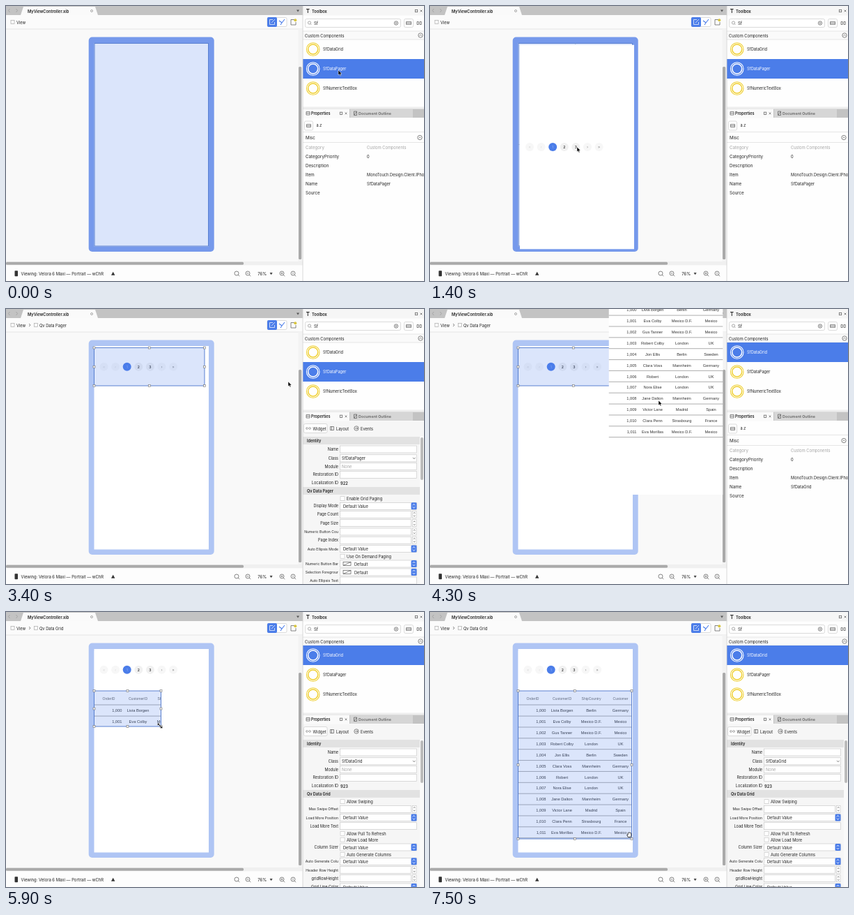
Recreate the animation shown at these times as an HTML page. Size 600 px wide and 394 px high, loop 9.03 s.

```html
<!DOCTYPE html>
<html lang="en">
<head>
<meta charset="utf-8">
<title>Designer drag and drop</title>
<style>
  html, body { margin: 0; width: 100%; height: 100%; overflow: hidden; background: #fff; }
  #stage { display: block; width: 100vw; height: 100vh; }
  text { font: 5.7px Inter, Roboto, sans-serif; fill: #222; dominant-baseline: central; white-space: pre; }
  .bold { font-weight: 600; }
  .dim { fill: #a5a5a5; }
  .end { text-anchor: end; }
  .mid { text-anchor: middle; }
  .prop { font-size: 6.2px; }
  .icon { fill: none; stroke: #555; stroke-width: .7; }
  .rule { stroke: #dcdcdc; stroke-width: .7; }
  .field { fill: #fff; stroke: #c4c4c4; stroke-width: .6; }
  .blue { fill: #4b7de9; }
  .ring { fill: none; stroke: #f0d032; }
  .item.on text { fill: #fff; }
  .item.on .ring { stroke: #fff; }
  .item .bar { fill: none; }
  .item.on .bar { fill: #4b7de9; }
  .cell { font: 5.7px "Liberation Sans", Arial, sans-serif; fill: #333; }
  .head { font-size: 5.1px; fill: #666; }
  .tint { fill: #4b7de9; fill-opacity: .2; stroke: #4b74cc; stroke-width: .9; }
  .handle { fill: #f4f4f4; stroke: #777; stroke-width: .6; transform: translate(-1.5px, -1.5px); }
  .guide { stroke: #8095c4; stroke-width: .6; stroke-dasharray: 2 1.5; }
  .sel { overflow: visible; }
</style>
</head>
<body>
<svg id="stage" viewBox="0 0 600 394" preserveAspectRatio="none">
  <defs>
    <g id="lens" class="icon"><circle r="3"/><path d="M2.2 2.2L4.2 4.2"/></g>
    <g id="fold" class="icon"><circle r="3.2"/><path d="M-1.5 .7L0 -.8L1.5 .7"/></g>
    <g id="pin" class="icon" stroke-width=".5"><rect x="-1.7" y="-1.7" width="3.4" height="3.4"/></g>
    <path id="cross" class="icon" d="M-1.3 -1.3L1.3 1.3M1.3 -1.3L-1.3 1.3"/>
  </defs>

  <!-- editor -->
  <rect width="426" height="394" fill="#f9f9f9"/>
  <rect width="426" height="13" fill="#c3c3c3"/>
  <path d="M21 13L25 1H128L132 13Z" fill="#fafafa"/>
  <path class="icon" d="M5.5 4L3.5 6.5L5.5 9M14.5 4L16.5 6.5L14.5 9" style="stroke:#999"/>
  <text class="bold" x="31" y="7">MyViewController.xib</text>
  <circle class="icon" cx="123" cy="7" r="1.5" style="stroke:#888"/>
  <path d="M417 5.5H421L419 8.5Z" fill="#555"/>
  <rect y="13" width="426" height="20" fill="#fbfbfb"/>
  <path class="rule" d="M0 33H426"/>
  <rect class="icon" x="7" y="20.5" width="5" height="5" style="stroke:#aaa"/>
  <text x="15" y="23">View</text>
  <g id="crumb">
    <path class="icon" d="M33 21L35 23L33 25"/>
    <rect class="icon" x="40.5" y="20.5" width="5" height="5" style="stroke:#aaa"/>
    <text id="crumbText" x="48" y="23"></text>
  </g>
  <rect class="field" x="375" y="16.5" width="28" height="13" rx="2"/>
  <rect class="blue" x="375" y="16" width="14" height="14" rx="2"/>
  <path class="icon" d="M383 19.5H378.5V26.5H385.5V23M381 24.2L386 19" style="stroke:#fff"/>
  <path d="M392 21L396 24L400 19M396 24L394 27" class="icon" style="stroke:#4b7de9;stroke-width:1.1"/>
  <path class="icon" d="M414 19.5H409V27H416V23"/>
  <circle cx="415.3" cy="20.3" r="2" fill="#d9c640"/>

  <!-- device -->
  <rect id="device" x="118.7" y="44.5" width="180" height="307.5" rx="5"/>
  <rect x="126.5" y="53" width="164.5" height="291.5" fill="#fff"/>
  <rect id="viewTint" class="tint" x="127" y="53.5" width="163.5" height="290.5"/>
  <svg id="pagerView" class="view"></svg>
  <svg id="gridView" class="view"></svg>
  <svg id="pagerSel" class="sel"></svg>
  <svg id="gridSel" class="sel"></svg>
  <path id="guides" class="guide" d="M208.7 53V345M126.5 198.5H291"/>

  <!-- scrollbars and status -->
  <rect x="419.5" y="33" width="6" height="333" fill="#f3f3f3"/>
  <rect x="420" y="87" width="4.2" height="276" rx="1.5" fill="#aaa"/>
  <rect y="366" width="426" height="5.5" fill="#f0f0f0"/>
  <rect y="366.8" width="341" height="4" rx="1.5" fill="#aaa"/>
  <rect y="371.5" width="426" height="22.5" fill="#fdfdfd"/>
  <rect x="12.5" y="379.3" width="4.5" height="8" rx=".8" fill="#333"/>
  <text x="21.5" y="383.3" style="font-size:5.9px">Viewing: Velora 6 Maxi — Portrait — wChR</text>
  <path d="M151 385.8H156.4L153.7 380.8Z" fill="#333"/>
  <use href="#lens" x="331" y="383"/>
  <use href="#lens" x="347" y="383"/><path class="icon" d="M345.6 383H348.4"/>
  <text x="361.3" y="383.3" style="font-size:6px">76%</text>
  <path d="M378.6 382H382.6L380.6 385.2Z" fill="#444"/>
  <use href="#lens" x="396" y="383"/><path class="icon" d="M394.6 383H397.4M396 381.6V384.4"/>
  <use href="#lens" x="412" y="383"/><path class="icon" d="M412 381.6V384.4"/>

  <!-- toolbox -->
  <rect x="426" width="174" height="394" fill="#fefefe"/>
  <rect x="426" width="174" height="13.5" fill="#f6f6f6"/>
  <path class="icon" d="M431 4.5H435.6M433.3 4.5V10" style="stroke:#222;stroke-width:1"/>
  <text class="bold" x="439" y="7">Toolbox</text>
  <use href="#pin" x="589" y="7"/><use href="#cross" x="596" y="7"/>
  <rect class="field" x="429.5" y="18.5" width="137" height="12" rx="2"/>
  <use href="#lens" transform="translate(435.5 24) scale(.7)"/>
  <text x="442" y="24.5" style="font-size:6px">Sf</text>
  <circle class="icon" cx="560" cy="24.5" r="2.7"/><use href="#cross" x="560" y="24.5"/>
  <rect class="field" x="571.5" y="18.5" width="13" height="12" rx="2"/>
  <path class="icon" d="M574.5 22.5H581.5V26.5H574.5ZM574.5 24.5H581.5M590 22.5H592.2V26.5H590ZM594 22.5H596.2V26.5H594Z"/>
  <rect x="426" y="36" width="174" height="12" fill="#fafafa"/>
  <path class="rule" d="M426 36H600M426 48H600"/>
  <text x="429" y="42">Custom Components</text>
  <use href="#fold" x="595" y="42"/>
  <g id="items"></g>

  <!-- properties -->
  <rect x="426" y="144.5" width="174" height="3" fill="#eee"/>
  <rect x="426" y="147.5" width="174" height="12.5" fill="#c3c3c3"/>
  <rect x="426" y="147.5" width="67" height="13" fill="#fafafa"/>
  <rect x="494" y="148" width="90" height="12" fill="#d6d6d6"/>
  <path class="icon" d="M431 151.5H436V156H431ZM431 153.7H436M499.5 151H503.5V156.5H499.5ZM500 156L503 151.5"/>
  <text class="bold" x="438" y="153.8" style="font-size:5.5px">Properties</text>
  <use href="#pin" x="481" y="153.8"/><use href="#cross" x="488" y="153.8"/>
  <text class="bold" x="506" y="153.8" style="font-size:5.4px;fill:#666">Document Outline</text>
  <g id="itemPanel">
    <rect class="field" x="428.5" y="165" width="12" height="13" rx="2"/>
    <path class="icon" d="M431.5 169.5H437.5V173.5H431.5ZM431.5 171.5H437.5"/>
    <text x="445.5" y="171" style="font-size:5.5px">a.z</text>
    <path class="rule" d="M426 180.5H600M426 195.5H600"/>
    <text class="prop" x="430" y="188.5">Misc</text>
    <use href="#fold" x="594" y="188.5"/>
    <g id="itemProps"></g>
  </g>
  <g id="pagerPanel"></g>
  <g id="gridPanel"></g>
  <path d="M426 0V394" stroke="#d0d0d0" stroke-width=".8"/>

  <svg id="pagerGhost"></svg>
  <svg id="gridGhost"></svg>

  <g id="cursor" stroke-linejoin="round">
    <path id="arrow" d="M0 0V7L1.6 5.6L2.7 8L3.9 7.5L2.9 5.1H5Z" stroke="#fff" stroke-width=".5"/>
    <path id="resize" d="M-3.5 -3.5H-.3L-1.4 -2.2L2.2 1.4L3.5 .3V3.5H.3L1.4 2.2L-2.2 -1.4L-3.5 -.3Z" stroke="#fff" stroke-width=".4"/>
    <path id="hand" d="M-1.8 3.5L-3.3 .2Q-3 -.8 -1.9 .4V-2.4Q-1.3 -3.3 -.8 -2.4Q-.2 -4 .4 -2.8Q1.1 -3.7 1.6 -2.3Q2.6 -2.8 2.8 -1.6V1.4L2 3.5Z" fill="#fff" stroke="#111" stroke-width=".8"/>
  </g>
</svg>

<script>
const LOOP = 9030, STEP = 100, LAST = 7500;
const $ = id => document.getElementById(id);
const text = (x, y, s, cls = '', size = '') =>
  `<text x="${x}" y="${y}" class="${cls}"${size && ` style="font-size:${size}px"`}>${s}</text>`;
const rect = (x, y, w, h, cls) => `<rect x="${x}" y="${y}" width="${w}" height="${h}" class="${cls}"/>`;

// ---- toolbox and item properties
const TITLES = { pager: 'Qv Data Pager', grid: 'Qv Data Grid' };
$('items').innerHTML = ['SfDataGrid', 'SfDataPager', 'SfNumericTextBox'].map((name, i) => {
  const y = 62 + 28 * i;
  return `<g class="item">${rect(426, y - 14, 174, 28, 'bar')}
    <circle class="ring" cx="440.7" cy="${y}" r="9.3" stroke-width="1.1"/>
    <circle class="ring" cx="440.7" cy="${y}" r="7" stroke-width="1.5"/>
    ${text(455, y + .3, name, '', 5.6)}</g>`;
}).join('');
const items = [...$('items').children];

$('itemProps').innerHTML = [
  ['Category', 'Custom Components'], ['CategoryPriority', '0'], ['Description', ''],
  ['Item', 'MonoTouch.Design.Client.IPhone'], ['Name', ''], ['Source', '']
].map(([label, value], i) => {
  const y = 202.5 + 13 * i, dim = i ? '' : ' dim';
  return text(430, y, label, 'prop' + dim) + text(518, y, value, dim);
}).join('') + '<text id="itemName" x="518" y="254.5"></text>';

// ---- widget property panels
const label = (y, s) => text(477, y, s, 'end', s.length > 15 ? 5.1 : 5.5);
const field = (y, w = 110) => rect(479.5, y - 5, w, 10, 'field');
const section = (y, s) => rect(426, y - 5.5, 168, 11, 'section') + text(432, y, s, 'bold', 5.5);
const picker = y => `<rect class="blue" x="581.5" y="${y - 5}" width="8" height="10" rx="1.5"/>
  <path d="M583.8 ${y - 1}l1.7 -2l1.7 2M583.8 ${y + 1}l1.7 2l1.7 -2" fill="none" stroke="#fff" stroke-width=".8"/>`;
const rows = {
  check: (y, s) => rect(480, y - 3, 6, 6, 'field') + text(489, y, s),
  text: (y, s) => label(y, s) + field(y),
  select: (y, s) => label(y, s) + field(y) + text(484, y, 'Default Value') + picker(y),
  color: (y, s) => label(y, s) + field(y) + rect(484, y - 2.5, 11, 5, 'icon') +
    `<path class="icon" d="M484 ${y + 2.5}l11 -5"/>` + text(500, y, 'Default') + picker(y),
  step: (y, s) => label(y, s) + field(y, 102) + rect(583.5, y - 5, 5.5, 10, 'field') +
    `<path class="icon" d="M585 ${y - 1.5}l1.2 -1.4l1.2 1.4M585 ${y + 1.5}l1.2 1.4l1.2 -1.4"/>`
};

function panel(title, cls, id, list) {
  return `<rect x="426" y="160.5" width="174" height="234" fill="#f6f6f6"/>
    <rect class="field" x="427.5" y="164.5" width="33.5" height="13" rx="2"/>
    <path class="icon" d="M432.5 169L430.5 171L432.5 173M435.5 169L437.5 171L435.5 173M432.5 171H435.5
      M465.5 168.5H470.5V173.5H465.5ZM467.5 168.5V173.5M501 171H505M503.5 169.5L505 171L503.5 172.5"/>
    <circle class="icon" cx="503" cy="171" r="3.2"/>
    ${text(440.5, 171, 'Widget')}${text(474, 171, 'Layout')}${text(509, 171, 'Events')}
    ${section(188.5, 'Identity')}
    ${rows.text(201, 'Name')}
    ${rows.text(213.8, 'Class')}${text(482, 213.8, cls)}
    <path class="icon" d="M584 212.8l1.8 2l1.8 -2"/>
    ${rows.text(225.5, 'Module')}${text(482, 225.5, 'None', 'dim')}
    ${rows.text(237.3, 'Restoration ID')}
    ${label(249, 'Localization ID')}${text(480, 249, id, 'bold')}
    ${section(260.5, title)}
    ${list.map(([y, type, s]) => rows[type](y, s)).join('')}
    <rect x="594" y="182" width="6" height="212" fill="#fafafa"/>
    <rect x="595" y="184" width="4" height="61" rx="2" fill="#bbb"/>`;
}
$('pagerPanel').innerHTML = panel(TITLES.pager, 'SfDataPager', 922, [
  [271.7, 'check', 'Enable Grid Paging'], [282.3, 'select', 'Display Mode'],
  [294.3, 'step', 'Page Count'], [306.7, 'step', 'Page Size'],
  [319, 'step', 'Numeric Button Cou'], [331.2, 'step', 'Page Index'],
  [343.6, 'select', 'Auto Ellipsis Mode'], [354.2, 'check', 'Use On Demand Paging'],
  [365, 'color', 'Numeric Button Bar'], [377, 'color', 'Selection Foregrour'],
  [389, 'text', 'Auto Ellipsis Text']
]);
$('gridPanel').innerHTML = panel(TITLES.grid, 'SfDataGrid', 923, [
  [271.7, 'check', 'Allow Swiping'], [282.3, 'step', 'Max Swipe Offset'],
  [294.5, 'select', 'Load More Position'], [306.7, 'text', 'Load More Text'],
  [317.5, 'check', 'Allow Pull To Refresh'], [326.2, 'check', 'Allow Load More'],
  [337, 'select', 'Column Sizer'], [347.3, 'check', 'Auto Generate Columns'],
  [357.3, 'select', 'Auto Generate Colu'], [369.5, 'step', 'Header Row Height'],
  [381.7, 'step', 'gridRowHeight'], [394, 'select', 'Grid Line Color']
]);
document.querySelectorAll('.section').forEach(s => s.setAttribute('fill', '#e2e2e2'));

// ---- dragged components
const paper = '<rect width="100%" height="100%" fill="#fff"/>';
const pager = paper + ['«', '‹', '1', '2', '3', '›', '»'].map((s, i) => {
  const x = 14 + 16.6 * i, now = i === 2, faint = i < 2 || i > 4;
  return `<circle cx="${x}" cy="50%" r="6" fill="${now ? '#4b7de9' : faint ? '#f7f7f7' : '#f1f1f1'}"/>
    <text class="mid bold" x="${x}" y="50%" style="font-size:5px;fill:${now ? '#7ea2f2' : i < 2 ? '#ddd' : faint ? '#999' : '#333'}">${s}</text>`;
}).join('');

const people = ['Livia Borgen', 'Eva Colby', 'Gus Tanner', 'Robert Colby', 'Jon Ellis', 'Clara Voss',
  'Robert', 'Nora Elise', 'Jane Dalton', 'Victor Lane', 'Clara Penn', 'Eva Morillas'];
const places = ['Berlin Germany', 'Mexico&nbsp;D.F. Mexico', 'Mexico&nbsp;D.F. Mexico', 'London UK',
  'Berlin Sweden', 'Mannheim Germany', 'London UK', 'London UK', 'Mannheim Germany', 'Madrid Spain',
  'Strasbourg France', 'Mexico&nbsp;D.F. Mexico'];
const colX = i => 21 + 42 * i;
const line = y => `<path d="M0 ${y}H164" stroke="#8a8a8a" stroke-width=".7"/>`;
const grid = paper + line(20) +
  ['OrderID', 'CustomerID', 'ShipCountry', 'Customer'].map((s, i) => text(colX(i), 10.5, s, 'cell head mid')).join('') +
  people.map((name, i) => {
    const y = 28.3 + 15.87 * i, [city, country] = places[i].split(' ');
    return text(40, y, '1,0' + String(i).padStart(2, '0'), 'cell end') + line(y + 7.8) +
      [name, city, country].map((s, c) => text(colX(c + 1), y, s, 'cell mid')).join('');
  }).join('');

const spots = [0, 50, 100];
const frame = '<rect class="tint" width="100%" height="100%"/>' +
  spots.flatMap(x => spots.filter(y => x !== 50 || y !== 50).map(y =>
    `<rect class="handle" x="${x}%" y="${y}%" width="3" height="3"/>`)).join('');
$('pagerView').innerHTML = $('pagerGhost').innerHTML = pager;
$('gridView').innerHTML = $('gridGhost').innerHTML = grid;
$('pagerSel').innerHTML = $('gridSel').innerHTML = frame;

// ---- motion: [ms, values, easing towards the next key]
const both = p => p * p * (3 - 2 * p), speedUp = p => p * p, slowDown = p => p * (2 - p);
const cursorKeys = [
  [200, [477, 92]], [1300, [211, 202]], [1500, [211, 202]], [2100, [174, 81]], [2200, [174, 81]],
  [2500, [221, 107]], [3000, [285, 109], speedUp], [3400, [405, 104], slowDown], [3700, [478, 63]],
  [3800, [478, 63], speedUp], [4300, [328, 131], slowDown], [4700, [211, 257]], [4900, [211, 257]],
  [5400, [174, 139]], [5500, [174, 139]], [5800, [221, 163]], [5900, [221, 163]],
  [7300, [288, 323]], [7500, [286, 319]]
];
const pagerGhostKeys = [[200, [477, 92]], [1300, [211, 202]]];
const gridGhostKeys = [[3800, [478, 63], speedUp], [4300, [338.5, 119.5], slowDown], [4700, [211, 257.5]]];
const pagerKeys = [
  [1500, [163, 177, 95, 51]], [2100, [126.5, 56, 95, 51]],
  [2500, [126.5, 56, 95, 51]], [3000, [126.5, 55.5, 158.5, 54.5]]
];
const gridKeys = [
  [4900, [163, 232, 95, 51]], [5400, [126.5, 113, 96, 51]],
  [5900, [126.5, 113, 96, 51]], [7300, [126.5, 113, 163, 212]]
];
const pointers = [[0, 'arrow'], [1500, 'hand'], [2400, 'resize'], [3100, 'arrow'],
  [4900, 'hand'], [5700, 'resize'], [7500, 'hand']];

function track(keys, t) {
  const i = keys.findIndex(k => k[0] > t);
  if (i < 1) return keys.at(i)[1];
  const [t0, from, ease = both] = keys[i - 1], [t1, to] = keys[i];
  const p = ease((t - t0) / (t1 - t0));
  return from.map((v, n) => v + (to[n] - v) * p);
}
function place(id, [x, y, width, height]) {
  for (const [k, v] of Object.entries({ x, y, width, height })) $(id).setAttribute(k, v);
}
const show = (id, on) => { $(id).style.display = on ? '' : 'none'; };
const within = (t, a, b) => t >= a && t < b;
const around = ([x, y]) => [x - 82, y - 146.5, 164, 293];

function draw(t) {
  const pagerOn = within(t, 1500, 4800), gridOn = t >= 4800;
  const widgetPager = within(t, 1500, 3700);

  $('device').setAttribute('fill', t < 1500 ? '#7699eb' : '#afc5f4');
  show('viewTint', t < 1500);
  show('crumb', t >= 1500);
  $('crumbText').textContent = gridOn ? TITLES.grid : TITLES.pager;

  items[0].classList.toggle('on', t >= 3700);
  items[1].classList.toggle('on', t < 3700);
  $('itemName').textContent = t < 3700 ? 'SfDataPager' : 'SfDataGrid';
  show('pagerPanel', widgetPager);
  show('gridPanel', gridOn);
  show('itemPanel', !widgetPager && !gridOn);

  const pagerBox = track(pagerKeys, t), gridBox = track(gridKeys, t);
  place('pagerView', pagerBox);
  place('pagerSel', pagerBox);
  place('gridView', gridBox);
  place('gridSel', gridBox);
  show('pagerView', t >= 1500);
  show('pagerSel', pagerOn);
  show('gridView', gridOn);
  show('gridSel', gridOn);

  place('pagerGhost', around(track(pagerGhostKeys, t)));
  place('gridGhost', around(track(gridGhostKeys, t)));
  show('pagerGhost', within(t, 300, 1500));
  show('gridGhost', within(t, 3900, 4800));
  show('guides', within(t, 1300, 1500) || within(t, 4600, 4800));

  const kind = pointers.findLast(p => p[0] <= t)[1];
  for (const id of ['arrow', 'resize', 'hand']) show(id, id === kind);
  $('cursor').setAttribute('transform', `translate(${track(cursorKeys, t)})`);
}

let start;
function tick(now) {
  start ??= now;
  const t = Math.max(0, now - start) % LOOP;
  draw(Math.min(Math.floor(t / STEP) * STEP, LAST));
  requestAnimationFrame(tick);
}
draw(0);
requestAnimationFrame(tick);
</script>
</body>
</html>
```
